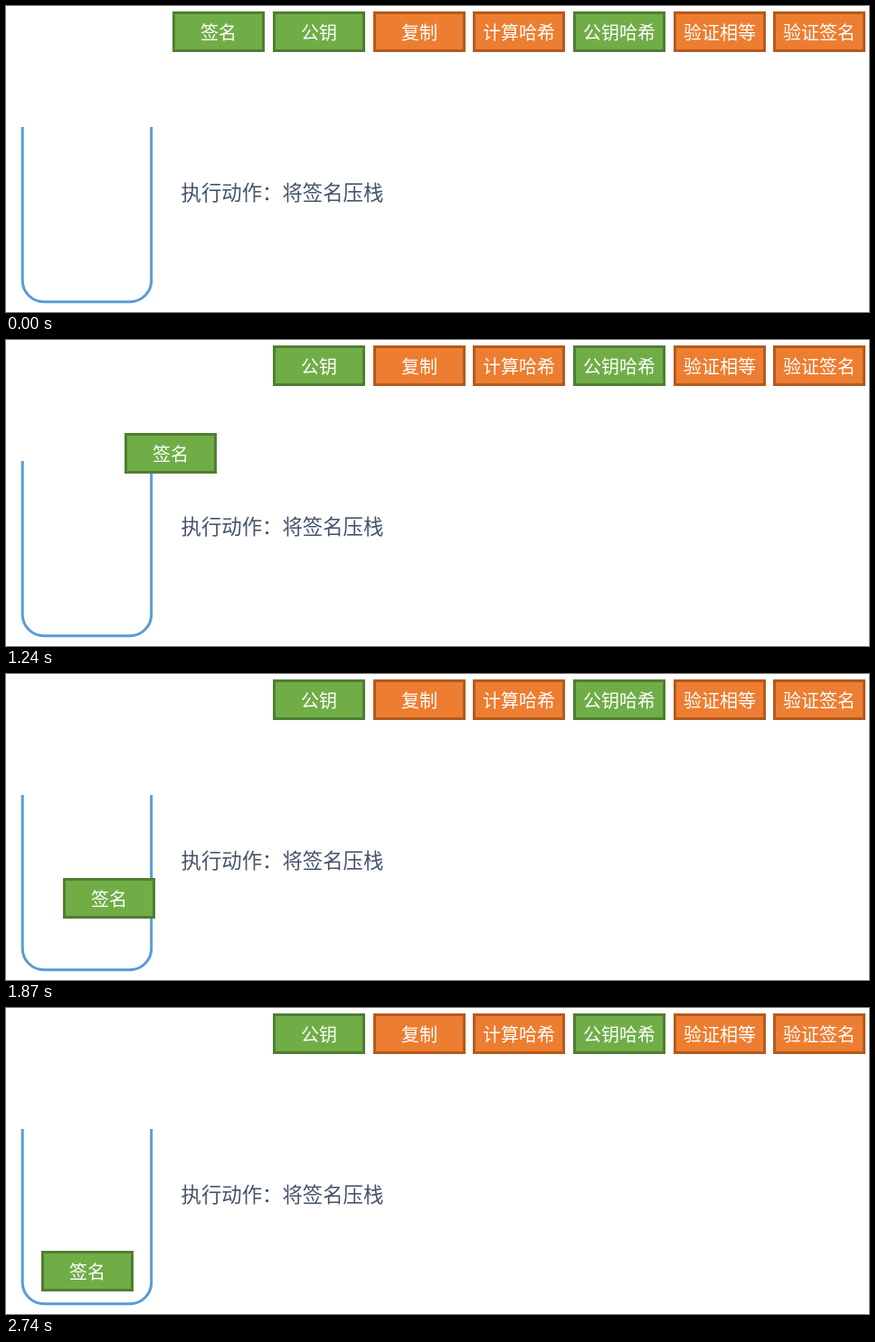
Recreate the animation shown at these times as an HTML page with a canvas. Size 954 by 339 pixels, loop 4700 ms.

```html
<!DOCTYPE html>
<html lang="zh-CN">
<head>
<meta charset="utf-8">
<title>将签名压栈</title>
<style>
  html, body { margin: 0; width: 100%; height: 100%; overflow: hidden; background: #fff; }
  canvas { display: block; }
</style>
</head>
<body>
<canvas id="stage" width="954" height="339"></canvas>
<script>
const ctx = document.getElementById('stage').getContext('2d');
const FONT = '"Noto Sans CJK SC", "Noto Sans CJK", sans-serif';
const GREEN = { fill: '#70ad47', edge: '#507e32' };
const ORANGE = { fill: '#ed7d31', edge: '#b45a1e' };

// Centre of the first card, spacing of the row, and the way into the stack
const LEFT = 235.3, TOP = 28.5, PITCH = 110.67;
const DX = -145, DY = 263;

// The card moves in even steps
const LOOP = 4700, BEGIN = 760, STEP = 79, STEPS = 26;

const script = [
  ['公钥', GREEN], ['复制', ORANGE], ['计算哈希', ORANGE],
  ['公钥哈希', GREEN], ['验证相等', ORANGE], ['验证签名', ORANGE]
];

// Short quadratic start, then a long power ease-out that meets it smoothly
const RAMP = 5.5;
const easeOut = s => 1 - ((STEPS - s) / 22.94) ** 2.45;
const ease = s => s < RAMP ? easeOut(RAMP) * (s / RAMP) ** 2 : easeOut(s);

function progress(t) {
  const step = Math.floor((t - BEGIN) / STEP) + 1;
  return ease(Math.min(STEPS, Math.max(0, step)));
}

function text(str, x, y, size, color, align, weight) {
  ctx.font = `${weight} ${size}px ${FONT}`;
  ctx.fillStyle = color;
  ctx.textAlign = align;
  ctx.fillText(str, x, y + size * 0.38);
}

function card(label, look, x, y) {
  const left = Math.round(x - 51), top = Math.round(y - 22.5);
  ctx.fillStyle = look.fill;
  ctx.strokeStyle = look.edge;
  ctx.lineWidth = 3;
  ctx.beginPath();
  ctx.rect(left + 1.5, top + 1.5, 99, 42);
  ctx.fill();
  ctx.stroke();
  text(label, left + 51, top + 23, 20, '#fff', 'center', 400);
}

function stack() {
  ctx.strokeStyle = '#5b9bd5';
  ctx.lineWidth = 3;
  ctx.beginPath();
  ctx.moveTo(18.2, 134);
  ctx.arcTo(18.2, 327.7, 160.7, 327.7, 23.75);
  ctx.arcTo(160.7, 327.7, 160.7, 134, 23.75);
  ctx.lineTo(160.7, 134);
  ctx.stroke();
}

function draw(t) {
  ctx.fillStyle = '#fff';
  ctx.fillRect(0, 0, 954, 339);
  stack();
  text('执行动作：将签名压栈', 193.5, 206, 22.4, '#44546a', 'left', 300);
  script.forEach(([label, look], i) => card(label, look, LEFT + PITCH * (i + 1), TOP));
  const p = progress(t);
  card('签名', GREEN, LEFT + DX * p, TOP + DY * p);
}

const start = performance.now();
function loop() {
  draw((performance.now() - start) % LOOP);
  requestAnimationFrame(loop);
}
loop();
</script>
</body>
</html>
```
